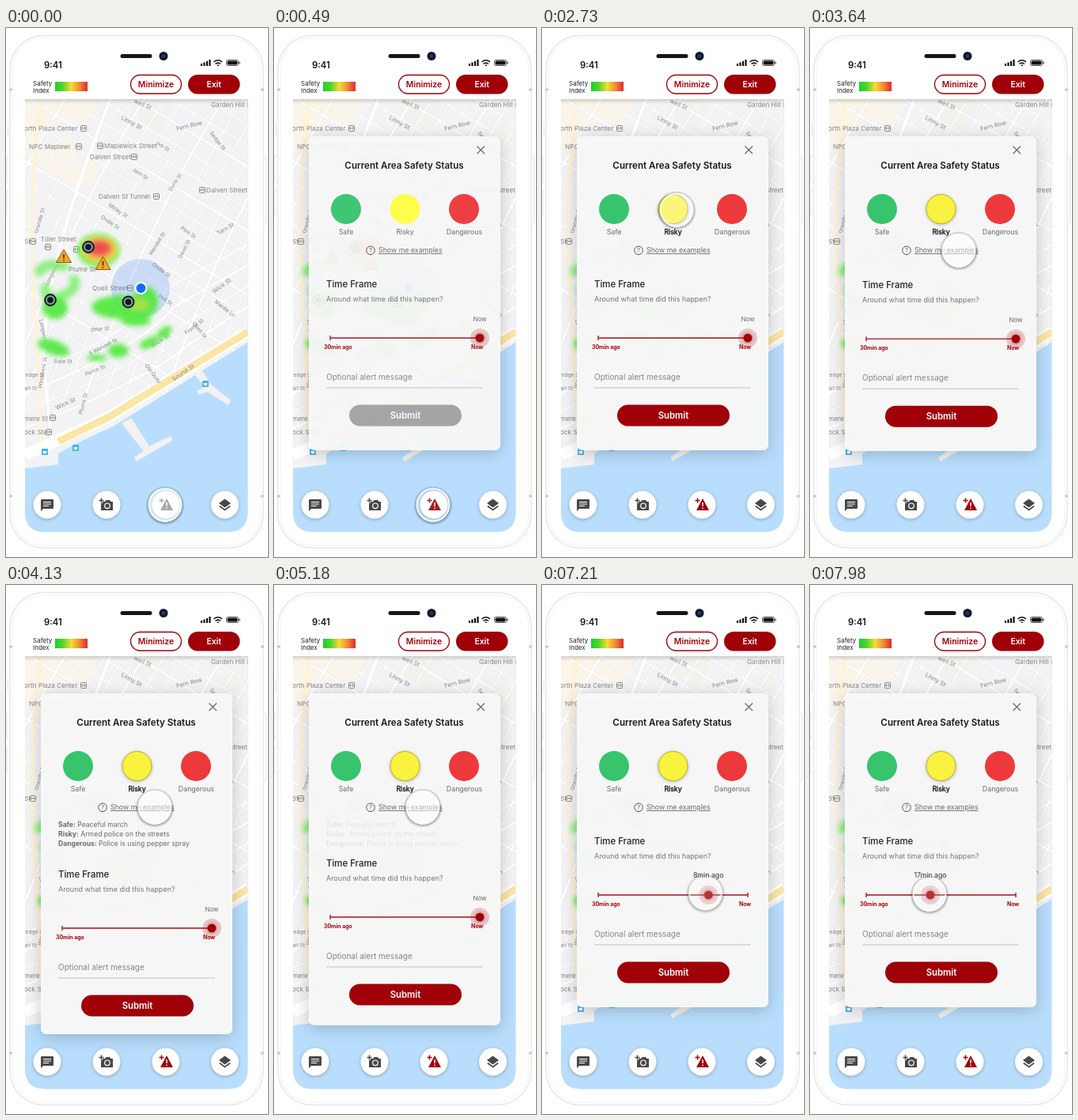
An HTML page for the animation above (8 s loop, 331 by 669 pixels).

```html
<!DOCTYPE html>
<html lang="en">
<head>
<meta charset="utf-8">
<title>Area safety report</title>
<style>
@property --min { syntax: "<integer>"; inherits: true; initial-value: 0; }
html, body { margin: 0; width: 100%; height: 100%; overflow: hidden; background: #fff; }
body { position: relative; font-family: Inter, sans-serif; }
svg { position: absolute; left: 0; top: 0; width: 331px; height: 669px; }
text { font-family: Inter, sans-serif; fill: #6a6a6a; font-size: 8.8px; }
.mid { text-anchor: middle; }
.b { font-weight: 600; fill: #171717; }
.bold { font-weight: 700; }
.lift { filter: drop-shadow(0 1px 2px #0004); }
#map text { fill: #858585; }

#modal, #sheet, #lower, #examples, #submit, #icon, #cursor, #glass, #pick, #picked,
#knob, #now, #minutes { animation: 8s ease-in-out infinite; }
#modal { animation-name: appear; }
#sheet { animation-name: grow; }
#lower { animation-name: slide; }
#examples { animation-name: examples; }
#submit { animation-name: enable; fill: #a3a3a3; }
#icon { animation-name: alert; }
#cursor { animation-name: roam; }
#glass { animation-name: press; fill: #fff; }
#pick { animation-name: pick; }
#picked { animation-name: label; }
#knob { animation-name: drag; }
#now { animation-name: now; }
#minutes {
  animation-name: drag, count, show; position: absolute; left: 220px; top: 361px; width: 80px;
  font-size: 8.8px; line-height: 12px; text-align: center; color: #333;
}
#minutes::after { counter-reset: m var(--min); content: counter(m) "min ago"; }

@keyframes appear { 0%, 1.5% { opacity: 0 } 6.3% { opacity: .97 } 8%, 100% { opacity: 1 } }
@keyframes grow { 0%, 45% { height: 397px } 49.4%, 63% { height: 431px } 67.4%, 100% { height: 397px } }
@keyframes slide { 0%, 45% { transform: none } 49.4%, 63% { transform: translateY(42px) } 67.4%, 100% { transform: none } }
@keyframes examples { 0%, 46.5% { opacity: 0 } 50%, 62.5% { opacity: 1 } 65.5%, 100% { opacity: 0 } }
@keyframes enable { 0%, 29.5% { fill: #a3a3a3 } 32.5%, 100% { fill: #a00008 } }
@keyframes alert { 0%, 1.5% { fill: #555; color: #555 } 5%, 100% { fill: #a00008; color: #a00008 } }
@keyframes pick { 0%, 29.5% { opacity: 0 } 32.5%, 100% { opacity: 1 } }
@keyframes label { 0%, 29.5% { fill: #6a6a6a; stroke: transparent } 32.5%, 100% { fill: #111; stroke: #111 } }
@keyframes roam {
  0%, 12.5% { transform: translate(201px, 603px) }
  24.4%, 29% { transform: translate(178px, 235px) }
  33%, 38% { transform: translate(170px, 230px) }
  44.5%, 67.5% { transform: translate(188px, 281px) }
  77.5%, 82.5% { transform: translate(254px, 388px) }
  98.5%, 100% { transform: translate(151px, 391px) }
}
@keyframes press {
  0% { fill-opacity: .5 } 6%, 14% { fill-opacity: .1 }
  19%, 29% { fill-opacity: .6 } 32%, 38% { fill-opacity: .3 }
  44%, 70% { fill-opacity: .5 } 78%, 100% { fill-opacity: .2 }
}
@keyframes drag { 0%, 82.5% { transform: none } 98.5%, 100% { transform: translateX(-108px) } }
@keyframes count { 0%, 82.5% { --min: 0 } 98.5%, 100% { --min: 17 } }
@keyframes now { 0%, 85.4% { opacity: 1 } 85.5%, 100% { opacity: 0 } }
@keyframes show { 0%, 85.4% { opacity: 0 } 85.5%, 100% { opacity: 1 } }
</style>
</head>
<body>
<svg viewBox="0 0 331 669">
  <defs>
    <linearGradient id="scale">
      <stop offset="0" stop-color="#20cf32"/><stop offset=".22" stop-color="#4bd52c"/>
      <stop offset=".5" stop-color="#f5dc35"/><stop offset=".75" stop-color="#f28a35"/>
      <stop offset="1" stop-color="#e3262c"/>
    </linearGradient>
    <linearGradient id="fade" x2="0" y2="1">
      <stop stop-color="#000" stop-opacity=".16"/><stop offset="1" stop-color="#000" stop-opacity="0"/>
    </linearGradient>
    <radialGradient id="rim">
      <stop offset=".83" stop-color="#000" stop-opacity="0"/><stop offset=".84" stop-color="#000" stop-opacity=".32"/>
      <stop offset="1" stop-color="#000" stop-opacity="0"/>
    </radialGradient>
    <filter id="soft" x="-30%" y="-30%" width="160%" height="160%"><feGaussianBlur stdDeviation="3"/></filter>
    <filter id="shade" x="-20%" y="-20%" width="140%" height="140%"><feDropShadow dx="0" dy="4" stdDeviation="10" flood-opacity=".2"/></filter>
    <clipPath id="screen"><path d="M24 90H305.5V612Q305.5 637.5 280 637.5H49.500Q24 637.5 24 612Z"/></clipPath>
    <clipPath id="shore"><path d="M24 90H306V397L223 449L135 504L96 522L84 528L66 538V552L24 557Z"/></clipPath>
    <g id="target"><circle r="7" fill="#7e9894" stroke="#101522" stroke-width="1.8"/><circle r="3.8" fill="#101522"/></g>
    <g id="warn"><path d="M0-9L9.5 7.5H-9.5Z" fill="#f5a623" stroke="#81601f" stroke-width="1" stroke-linejoin="round"/><path d="M0-3V2.5M0 4V5.6" stroke="#3b3022" stroke-width="1.6"/></g>
    <g id="ferry"><rect x="-4" y="-4" width="8" height="8" rx="1" fill="#43b5ee"/><path d="M-2.2-1H2.2V1.4L0 2.5L-2.2 1.4Z" fill="#fff"/></g>
    <g id="metro"><rect x="-3.5" y="-3.5" width="7" height="7" rx="1" fill="#fff" stroke="#777" stroke-width=".9"/><path d="M-1.8 2V-1.8L0 .6L1.8-1.8V2" fill="none" stroke="#777" stroke-width=".8"/></g>
  </defs>

  <g fill="#fff" stroke="#e6e6e8">
    <path d="M5 120H2.5V136H5M5 161H2Q1 161 1 164V193Q1 196 2 196H5M5 205H2Q1 205 1 208V235Q1 238 2 238H5M324.500 161H327Q328.500 161 328.500 164V245Q328.500 248 327 248H324.500"/>
    <rect x="5" y="9.500" width="320" height="648" rx="43" stroke-width="1.4"/>
    <rect x="8" y="12.500" width="314" height="642" rx="40" stroke="#f3f3f4"/>
    <path d="M4 78H8M322 78H326M4 592H8M322 592H326" stroke="#ccc" stroke-width="3"/>
  </g>

  <g id="map" clip-path="url(#screen)">
    <path d="M24 90H306V638H24Z" fill="#b9defd"/>
    <g fill="#f3f2f0">
      <path d="M146 500L158 493L181 529L208 516L211 521L165 548L162 543L174 535Z"/>
      <path d="M238 438L246 430L259 451L284 471L281 477L254 460L243 464L241 459L251 454Z"/>
    </g>
    <g clip-path="url(#shore)">
      <path d="M24 90H306V560H24Z" fill="#f3f3f5"/>
      <path d="M24 90H115L103 122L65 120L24 160ZM30 160L80 135L92 164L62 190ZM68 180L108 166L121 188L82 206Z" fill="#fbf4e8"/>
      <path d="M165 90H215L194 130L156 110ZM262 117L290 108L305 140L285 153Z" fill="#f0f3ed"/>
      <g id="roads" fill="none"></g>
      <path d="M44 90Q28 210 34 310T45 525" fill="none" stroke="#fff3d6" stroke-width="4"/>
      <path d="M306 384L223 435L130 492L24 540" fill="none" stroke="#fff" stroke-width="14"/>
      <path d="M306 384L223 435L130 492L66 523" fill="none" stroke="#fbe6a5" stroke-width="9"/>
    </g>
    <g id="names"></g>
    <circle cx="170" cy="329" r="37" fill="#4b90f2" opacity=".24"/>
    <g filter="url(#soft)" opacity=".88">
      <g fill="none" stroke="#5cec48" stroke-width="13" stroke-linecap="round" opacity=".75">
        <path d="M42 308Q50 296 73 301M50 329Q52 352 66 350M66 340Q91 333 86 318"/>
      </g>
      <g fill="#48e834">
        <ellipse cx="117" cy="281" rx="27" ry="21"/><ellipse cx="146" cy="353" rx="38" ry="15"/>
        <ellipse cx="176" cy="346" rx="16" ry="19"/><ellipse cx="164" cy="370" rx="19" ry="7"/>
        <ellipse cx="60" cy="404" rx="21" ry="9" transform="rotate(20 60 404)"/>
        <ellipse cx="115" cy="417" rx="13" ry="4"/><ellipse cx="142" cy="408" rx="13" ry="9"/>
        <ellipse cx="62" cy="354" rx="16" ry="14"/>
        <ellipse cx="181" cy="398" rx="13" ry="6" transform="rotate(-25 181 398)"/>
        <ellipse cx="200" cy="385" rx="11" ry="6" transform="rotate(-35 200 385)"/>
      </g>
      <ellipse cx="118" cy="280" rx="22" ry="16" fill="#f0df35"/>
      <ellipse cx="118" cy="279" rx="18" ry="13" fill="#f57b37"/>
      <ellipse cx="118" cy="278" rx="13" ry="9" fill="#ef3636"/>
      <ellipse cx="168" cy="350" rx="13" ry="7" fill="#a5df31"/>
    </g>
    <circle cx="170.500" cy="329" r="7" fill="#136cf5" stroke="#fff" stroke-width="2"/>
    <use href="#target" x="104" y="277"/><use href="#target" x="56" y="344"/><use href="#target" x="154.500" y="346.500"/>
    <use href="#warn" x="73" y="289"/><use href="#warn" x="122.500" y="298"/>
    <use href="#ferry" x="49" y="536"/><use href="#ferry" x="88" y="531"/><use href="#ferry" x="252" y="450"/>
  </g>

  <path d="M24 46H305.500V90H24Z" fill="#fff"/>
  <path d="M24 90H305.500V96H24Z" fill="url(#fade)"/>
  <rect x="144.500" y="33" width="40" height="5" rx="2.500" fill="#15161a"/>
  <circle cx="199" cy="35.500" r="5.500" fill="#111a2b"/><circle cx="199" cy="35.500" r="2" fill="#263f68"/>
  <text class="b" x="48" y="51" style="font-size:11.3px">9:41</text>
  <g fill="none" stroke="#111">
    <path d="M247 48V45M250.500 48V43.500M254 48V42M257.500 48V40" stroke-width="2.200"/>
    <path d="M262.500 43Q267.800 38.500 273 43M264.500 45.500Q267.800 42.700 271 45.500" stroke-width="1.600"/>
    <path d="M267.800 46.500V48" stroke-width="2"/>
    <rect x="278.500" y="40.500" width="15" height="7" rx="2" stroke-width=".7"/>
    <rect x="280" y="42" width="12" height="4" rx="1" fill="#111"/>
    <path d="M295 42.500V45.500"/>
  </g>
  <text x="34" y="72.500" style="font-size:8px;fill:#222">Safety</text>
  <text x="34" y="81.500" style="font-size:8px;fill:#222">Index</text>
  <rect x="62" y="68" width="41" height="12" fill="url(#scale)"/>
  <rect x="157.500" y="59.500" width="64" height="23.500" rx="11.700" fill="#fff" stroke="#a00008" stroke-width="1.300"/>
  <text class="mid b" x="189.500" y="75" style="font-size:10.4px;fill:#a00008">Minimize</text>
  <rect x="230" y="59" width="65.500" height="24.500" rx="12.200" fill="#a00008"/>
  <text class="mid b" x="262.700" y="75" style="font-size:10.4px;fill:#fff">Exit</text>

  <g id="tools">
    <g fill="#fff" class="lift"><circle cx="52" cy="603" r="17.500"/><circle cx="127" cy="603" r="17.500"/><circle cx="202" cy="603" r="17.500"/><circle cx="276.500" cy="603" r="17.500"/></g>
    <g fill="#484848">
      <path d="M46 596H59Q60 596 60 597V607Q60 608 59 608H47L44 611V597Q44 596 46 596Z"/>
      <path d="M47 599.500H57M47 602H57M47 604.500H54" stroke="#fff" stroke-width="1.100"/>
      <path d="M122 599H125L126.500 597H131L132.500 599H135V610H120V601H122Z"/>
      <circle cx="128" cy="604.300" r="3.300" fill="none" stroke="#fff" stroke-width="1.200"/>
      <path d="M120.500 594.500V600.500M117.500 597.500H123.500" stroke="#484848" stroke-width="1.500"/>
      <path d="M276.500 595.500L284 601L276.500 606.500L269 601Z"/>
      <path d="M269.800 604.500L276.500 609.500L283.200 604.500" fill="none" stroke="#484848" stroke-width="1.600"/>
    </g>
    <g id="icon"><path d="M203 595L211 610H195Z"/><path d="M203 600V605M203 606.500V608" stroke="#fff" stroke-width="1.500"/><path d="M196.500 594.500V600.500M193.500 597.500H199.500" stroke="currentColor" stroke-width="1.500"/></g>
  </g>

  <g id="modal">
    <rect id="sheet" x="44" y="137" width="242" height="397" rx="7" fill="#f7f7f7" fill-opacity=".985" filter="url(#shade)"/>
    <path d="M256.500 149.500L266 159M266 149.500L256.500 159" stroke="#666" stroke-width="1.200"/>
    <text class="mid b" x="164.500" y="178" style="font-size:11.6px">Current Area Safety Status</text>
    <circle cx="91" cy="229" r="19" fill="#37c46d"/>
    <circle cx="165.500" cy="229" r="19" fill="#fffe46"/>
    <circle id="pick" class="lift" cx="165.500" cy="229" r="18.500" fill="#f9f23e" stroke="#aaa13a" stroke-width=".8"/>
    <circle cx="240" cy="229" r="19" fill="#ed393b"/>
    <text class="mid" x="91" y="260.500">Safe</text>
    <text class="mid" id="picked" x="165.500" y="260.500" stroke-width=".3">Risky</text>
    <text class="mid" x="240.500" y="260.500">Dangerous</text>
    <circle cx="122" cy="281.300" r="5.300" fill="none" stroke="#555"/>
    <text class="mid" x="122" y="284.300" style="font-size:8px">?</text>
    <text x="132" y="284" text-decoration="underline">Show me examples</text>
    <g id="examples">
      <text x="66" y="305.500" style="font-size:8.600px"><tspan class="bold">Safe:</tspan> Peaceful march</text>
      <text x="66" y="317.800" style="font-size:8.600px"><tspan class="bold">Risky:</tspan> Armed police on the streets</text>
      <text x="66" y="330" style="font-size:8.600px"><tspan class="bold">Dangerous:</tspan> Police is using pepper spray</text>
    </g>
    <g id="lower">
      <text x="66" y="328" style="font-size:11.4px;font-weight:500;fill:#222">Time Frame</text>
      <text x="66" y="346" style="font-size:9px;fill:#777">Around what time did this happen?</text>
      <text id="now" class="mid" x="260" y="371" style="font-size:8px">Now</text>
      <path d="M71 392H260M71 389V395M260 389V395" stroke="#a81118" stroke-width="1.300"/>
      <g id="knob"><circle cx="260" cy="392" r="12" fill="#a00008" opacity=".2"/><circle cx="260" cy="392" r="8" fill="#a00008" opacity=".12"/><circle cx="260" cy="392" r="5.500" fill="#a00008"/></g>
      <text class="bold" x="63" y="406" style="font-size:6.900px;fill:#a00008">30min ago</text>
      <text class="mid bold" x="256.500" y="406" style="font-size:6.900px;fill:#a00008">Now</text>
      <text x="66" y="445.300" style="font-size:10px;fill:#858585">Optional alert message</text>
      <path d="M66 455H264" stroke="#bbb" stroke-width=".9"/>
      <rect id="submit" x="95" y="476.500" width="142" height="27" rx="13.500"/>
      <text class="mid b" x="166" y="494.200" style="font-size:11.4px;fill:#fff">Submit</text>
    </g>
  </g>
  <g id="cursor">
    <circle cy="1" r="25" fill="url(#rim)"/>
    <circle id="glass" r="20.500" stroke="#fff" stroke-opacity=".9" stroke-width="2"/>
  </g>
</svg>
<div id="minutes"></div>
<script>
const roads = document.getElementById("roads");
const names = document.getElementById("names");
const add = (parent, tag, attrs, text = "") => {
  const node = document.createElementNS("http://www.w3.org/2000/svg", tag);
  for (const key in attrs) node.setAttribute(key, attrs[key]);
  node.textContent = text;
  parent.append(node);
};
// Each road is a white strip with a faint kerb
const paths = [];
const road = (d, width) => paths.push([d, width]);

for (let i = 0; i < 18; i++) {
  road(`M24 ${i * 27 - 75}l282 170`, i % 3 ? 1.4 : 2.4);
  road(`M${75 + i * 25} 90q-100 160-180 390`, i % 4 ? 1.4 : 2.6);
}
for (let k = 1; k < 5; k++)
  road(`M306 ${378 - k * 26}L${240 - k * 9} ${424 - k * 24}Q${190 - k * 5} ${462 - k * 20} 24 ${528 - k * 22}`, k % 2 ? 2.8 : 1.8);
road("M132 90Q92 190 70 270T48 430L58 525", 4);
for (const [d, width] of paths) add(roads, "path", { d, stroke: "#e9e9ed", "stroke-width": width + 1 });
for (const [d, width] of paths) add(roads, "path", { d, stroke: "#fff", "stroke-width": width });

const label = (text, x, y, turn = 0, size = 6.6) =>
  add(names, "text", { x, y, transform: `rotate(${turn} ${x} ${y})`, style: `font-size:${size}px` }, text);

// Stations and larger place names
[["Garden Hill H", 259, 100], ["orth Plaza Center", 23, 130], ["NPC Maplewi", 29, 153],
 ["Maplewick Street", 124, 152], ["Dalven Street", 106, 166], ["Dalven St Tunnel", 117, 216],
 ["Dalven Street", 253, 208], ["Tiller Street", 44, 270], ["Plume St", 79, 308],
 ["Quell Street", 109, 332], ["St", 23, 273], ["mere St", 23, 497], ["ock Sta", 23, 514]
].forEach(([text, x, y]) => label(text, x, y, 0, 8.2));
[[98, 127], [92, 150], [119, 149], [162, 163], [190, 213], [248, 205], [34, 270],
 [53, 277], [89, 280], [157, 329], [59, 493], [54, 511]
].forEach(([x, y]) => add(names, "use", { href: "#metro", x, y }));

// Street names along their roads
[["well St", 161, 94, 24, 7.5], ["Linny St", 145, 115, 29, 7.5], ["Fern Row", 216, 130, -14, 7.5],
 ["Ivo St", 190, 147, 32], ["Jarn St", 159, 180, 34], ["Mirley St", 129, 225, 34],
 ["Ondle St", 119, 240, 34], ["Sedge St", 257, 133, 52], ["Dorlo St", 209, 207, -58],
 ["Plint St", 220, 254, 35], ["Gavel St", 221, 292, -62], ["Tarn St", 268, 262, -30, 7],
 ["Wendell St", 184, 288, -58], ["Ondle St", 184, 300, 36], ["Pell St", 192, 340, 34],
 ["Mardle Ln", 263, 347, 38], ["Wick St", 263, 336, -36, 7.5], ["Longwick", 53, 326, -62],
 ["Grandle St", 40, 260, -74], ["Longwick", 42, 369, 78]
].forEach(row => label(...row));
[["Otter St", 107, 384, -5], ["S Wendell St", 106, 414, -27], ["Slate St", 60, 424, 0],
 ["Perrin St", 101, 440, -22], ["Wick St", 185, 405, -34, 7.5], ["Wick St", 64, 483, -25, 7.5],
 ["Sound St", 212, 447, -35, 7.5], ["Old Quay", 175, 427, 52], ["ledge St", 23, 441, 0],
 ["arl St", 23, 458, 0], ["Windmere St", 45, 456, -80], ["Plume St", 96, 489, -75],
 ["Frome St", 228, 388, -38], ["Quell St", 235, 374, 50]
].forEach(row => label(...row));
</script>
</body>
</html>
```
